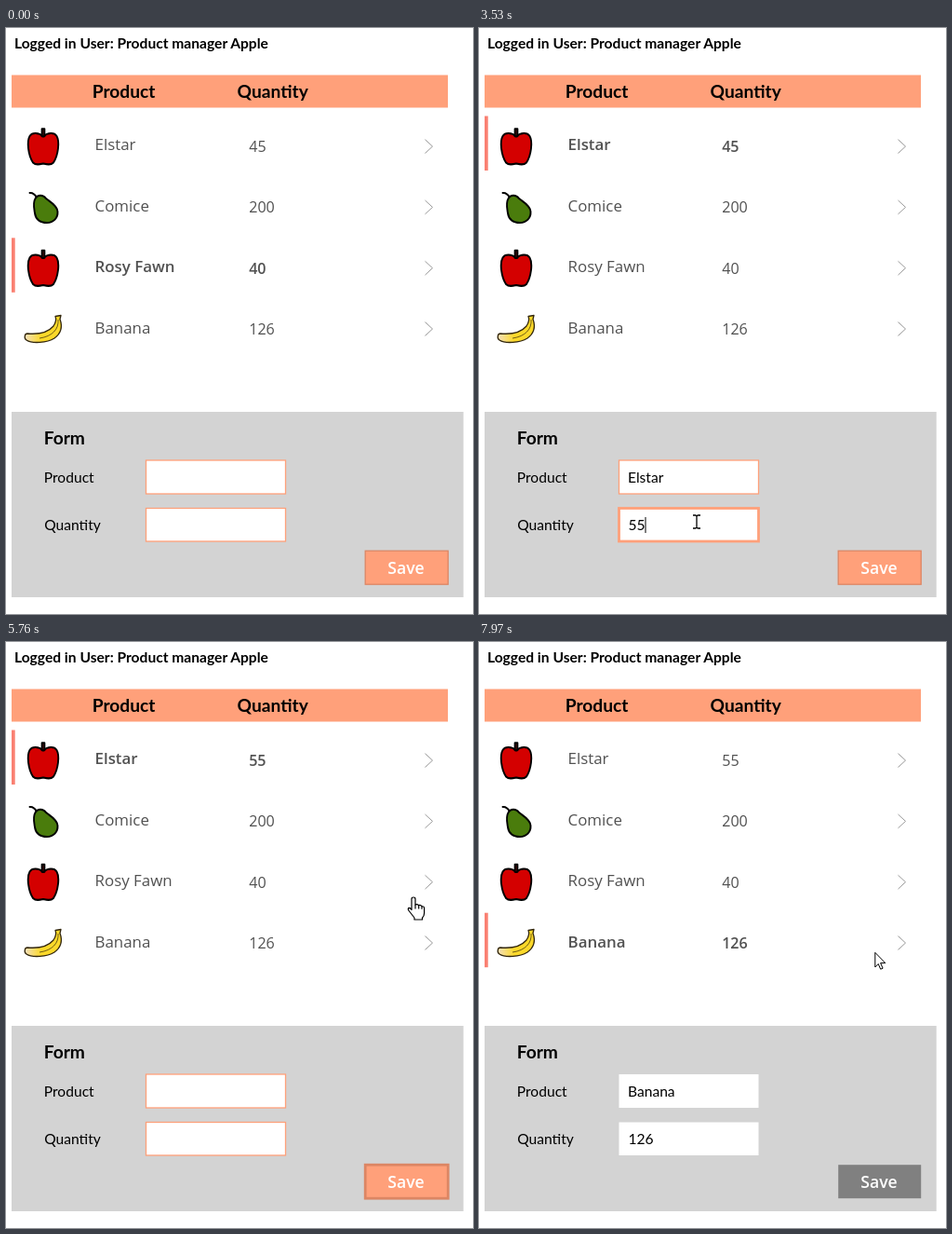
An HTML page that plays this animation: 502 px wide and 629 px high, repeating every 8 s.

```html
<!DOCTYPE html>
<html lang="en">
<head>
<meta charset="utf-8">
<title>Product form</title>
<style>
  html, body { margin: 0; width: 100%; height: 100%; overflow: hidden; background: #fff; }
  svg { display: block; width: 502px; height: 629px; }
  text { font-family: "Open Sans", sans-serif; white-space: pre; }
  .lato { font-family: Lato, sans-serif; font-size: 15.6px; }
  .bold { font-weight: 700; }
  .head { font-size: 19.2px; }
  .name { font-size: 16.9px; }
  .qty { font-size: 16.1px; }
</style>
</head>
<body>
<svg id="stage" viewBox="0 0 502 629" xmlns="http://www.w3.org/2000/svg">
  <defs>
    <linearGradient id="peel">
      <stop offset="0" stop-color="#f3dfbd"/>
      <stop offset=".45" stop-color="#fcd92a"/>
    </linearGradient>
    <g id="apple" stroke="#000" stroke-width="1.9" stroke-linejoin="round">
      <path fill="#d40000" d="M40 116.5C35 112 28 112 25.5 116C22 122 24 137 29 144.5C32 147.5 36 146.5 40 145.5C44 146.5 48 147.5 51 144.5C56 137 58 122 54.5 116C52 112 45 112 40 116.5Z"/>
      <path fill="#5a1010" d="M38.6 108.2h2.8v8h-2.8z"/>
    </g>
    <g id="pear" stroke="#000" stroke-width="1.9" stroke-linecap="round">
      <path fill="none" d="M25.5 177Q30 176.5 33 182"/>
      <path fill="#4a7c0c" d="M31.5 183C34 178.5 40 179 43 183C47 186.5 55 190 55.5 197C56 204 51 209 44 209C36 209 32 205 31 199C30.5 195 28.5 188 31.5 183Z"/>
    </g>
    <g id="banana" stroke="#33270c" stroke-width="1.3" stroke-linejoin="round">
      <path fill="url(#peel)" d="M53 309.5L59 308.5L58 312.5C61 321 59 328 52 333C44 338 28 339 22 335C19 333 20 328 23 328C34 329 45 327 51 320C53 317 54.5 313 53 309.5Z"/>
      <path fill="none" stroke-width=".7" d="M56 313C57 323 50 331 36 333"/>
    </g>
    <g id="hand" fill="#fff" stroke="#000" stroke-width="1.2" stroke-linejoin="round">
      <path d="M-2 2Q-2 0 0 0Q2 0 2 2V8Q4 6.8 5.7 8.6Q7.8 7.8 9 9.8Q11.6 9.4 11.6 12V17Q11.6 20 9.5 22V24H1V22L-5.3 14Q-6.4 11.6 -4.5 11.4Q-3.5 11.4 -2 13.4Z"/>
      <path fill="none" d="M2 8v4.5M5.7 8.6v4M9 9.8v3"/>
    </g>
    <path id="arrow" fill="#fff" stroke="#000" stroke-linejoin="round" d="M.3 .3V16L3.7 12.5L6.2 18.2L8.6 17.2L6.1 11.6H11.3Z"/>
    <path id="beam" fill="none" stroke="#000" stroke-width="1.3" d="M-4 -7H-1.2L0 -6L1.2 -7H4M0 -6V6M-4 7H-1.2L0 6L1.2 7H4"/>
  </defs>

  <rect width="502" height="629" fill="#fff"/>
  <text class="lato bold" x="9" y="22">Logged in User: Product manager Apple</text>
  <rect x="6" y="50.5" width="469" height="35" fill="#ffa07a"/>
  <text class="lato bold head" x="92.7" y="75">Product</text>
  <text class="lato bold head" x="248.6" y="75">Quantity</text>
  <rect id="bar" x="6" width="3.7" height="58.5" fill="#fa8072"/>
  <g id="rows" fill="#515151"></g>
  <use href="#apple"/>
  <use href="#pear"/>
  <use href="#apple" y="130.5"/>
  <use href="#banana"/>

  <rect x="6" y="412" width="485.7" height="199" fill="#d3d3d3"/>
  <text class="lato bold head" x="40.7" y="447">Form</text>
  <text class="lato" x="40.8" y="488">Product</text>
  <text class="lato" x="41.2" y="539">Quantity</text>
  <rect id="productBox" x="150.5" y="464" width="150" height="36" fill="#fff"/>
  <rect id="quantityBox" x="150.5" y="515.5" width="150" height="35.5" fill="#fff"/>
  <text id="product" class="lato" x="160" y="488"></text>
  <text id="quantity" class="lato" x="160.4" y="539"></text>
  <rect id="caret" y="525" width="1" height="17"/>
  <rect id="saveBox" x="386.2" y="561.2" width="89" height="36"/>
  <text x="410.3" y="586" font-size="17.6" font-weight="600" fill="#fff">Save</text>
  <use id="cursor"/>
</svg>
<script>
const LOOP = 8000;
const SALMON = '#ffa07a';
const $ = id => document.getElementById(id);
const set = (el, attrs) => { for (const k in attrs) el.setAttribute(k, attrs[k]); };

const stock = [['Elstar', 45], ['Comice', 200], ['Rosy Fawn', 40], ['Banana', 126]];

function add(parent, tag, attrs, text = '') {
  const el = document.createElementNS('http://www.w3.org/2000/svg', tag);
  set(el, attrs);
  el.textContent = text;
  return parent.appendChild(el);
}

const rows = stock.map(([name, count], i) => {
  const y = 65.3 * i;
  add($('rows'), 'path', {
    d: `M450.5 ${119.7 + y}l8 7.4l-8 7.4`, fill: 'none', stroke: '#999'
  });
  return {
    name: add($('rows'), 'text', { class: 'name', x: 95.5, y: 131 + 65.5 * i }, name),
    qty: add($('rows'), 'text', { class: 'qty', x: 261.2, y: 133 + y }, count)
  };
});

// Values that switch at [time, value].
const selected = [[0, 2], [1040, 0], [6210, 2], [7830, 3]];
const stocked = [[0, '45'], [4670, '55']];
const productText = [[0, ''], [1110, 'Elstar'], [4670, ''], [6310, 'Rosy Fawn'], [7900, 'Banana']];
const quantityText = [[0, ''], [1110, '45'], [2930, '4'], [3030, ''], [3390, '5'], [3530, '55'],
  [4670, ''], [6310, '40'], [7900, '126']];
const focus = [[0, ''], [2440, 'quantity'], [4400, 'save'], [6110, '']];
const disabledFrom = 7900;

const valueAt = (track, t) => track.filter(([time]) => time <= t).pop()[1];

// Pointer moves: start, end, number of steps, evenly timed points.
const moves = [
  [500, 1110, 10, [[470, 152], [449, 118], [447, 121], [447, 121]]],
  [1730, 2470, 12, [[447, 121], [402, 218], [254, 475], [237, 520], [234, 530]]],
  [4000, 4470, 8, [[234, 530], [300, 548], [388, 572], [414, 573], [414, 573]]],
  [5290, 6040, 12, [[414, 573], [428, 415], [438, 274], [445, 262]]],
  [6970, 7240, 5, [[445, 262], [432, 298], [415.5, 335.7]]],
  [7570, 7970, 6, [[415.5, 335.7], [433, 322], [436, 326], [425.5, 333]]]
];

function pointerAt(t) {
  const move = moves.filter(([start]) => start <= t).pop();
  if (!move) return null;
  const [start, end, steps, points] = move;
  const step = Math.floor((t - start) / (end - start) * (steps - 1) + 0.15) + 1;
  const p = Math.min(1, step / steps) * (points.length - 1);
  const i = Math.min(Math.floor(p), points.length - 2);
  return points[i].map((v, axis) => v + (points[i + 1][axis] - v) * (p - i));
}

function targetAt([x, y]) {
  const inside = (left, top, right, bottom) => x >= left && x <= right && y >= top && y <= bottom;
  if (inside(150, 463, 301, 500) || inside(150, 515, 301, 551)) return 'input';
  if (inside(386, 561, 475, 597)) return 'save';
  return inside(430, 94, 478, 349) ? 'row' : '';
}

const shapes = { input: '#beam', save: '#hand', row: '#hand', '': '#arrow' };

function render(t) {
  const current = valueAt(selected, t);
  const focused = valueAt(focus, t);
  const disabled = t >= disabledFrom;
  const pointer = pointerAt(t);
  const target = pointer ? targetAt(pointer) : '';

  set($('bar'), { y: 94.5 + 65.4 * current });
  rows.forEach(({ name, qty }, i) => {
    for (const el of [name, qty]) set(el, { 'font-weight': i === current ? 600 : 400 });
  });
  rows[0].qty.textContent = valueAt(stocked, t);

  $('product').textContent = valueAt(productText, t);
  $('quantity').textContent = valueAt(quantityText, t);
  const border = disabled ? 'none' : SALMON;
  set($('productBox'), { stroke: border, 'stroke-width': 1.3 });
  set($('quantityBox'), { stroke: border, 'stroke-width': focused === 'quantity' ? 2.8 : 1.3 });
  set($('caret'), {
    x: 160.4 + $('quantity').getComputedTextLength(),
    visibility: focused === 'quantity' ? 'visible' : 'hidden'
  });

  const saveActive = focused === 'save';
  set($('saveBox'), {
    fill: disabled ? '#808080' : SALMON,
    stroke: disabled ? 'none' : saveActive && target === 'save' ? '#de9880' : '#dc8664',
    'stroke-width': saveActive ? 2.8 : 1.3
  });

  set($('cursor'), { visibility: pointer ? 'visible' : 'hidden' });
  if (pointer) set($('cursor'), { href: shapes[target], x: pointer[0], y: pointer[1] });
}

const begin = performance.now();
function tick() {
  render((performance.now() - begin) % LOOP);
  requestAnimationFrame(tick);
}
tick();
</script>
</body>
</html>
```
